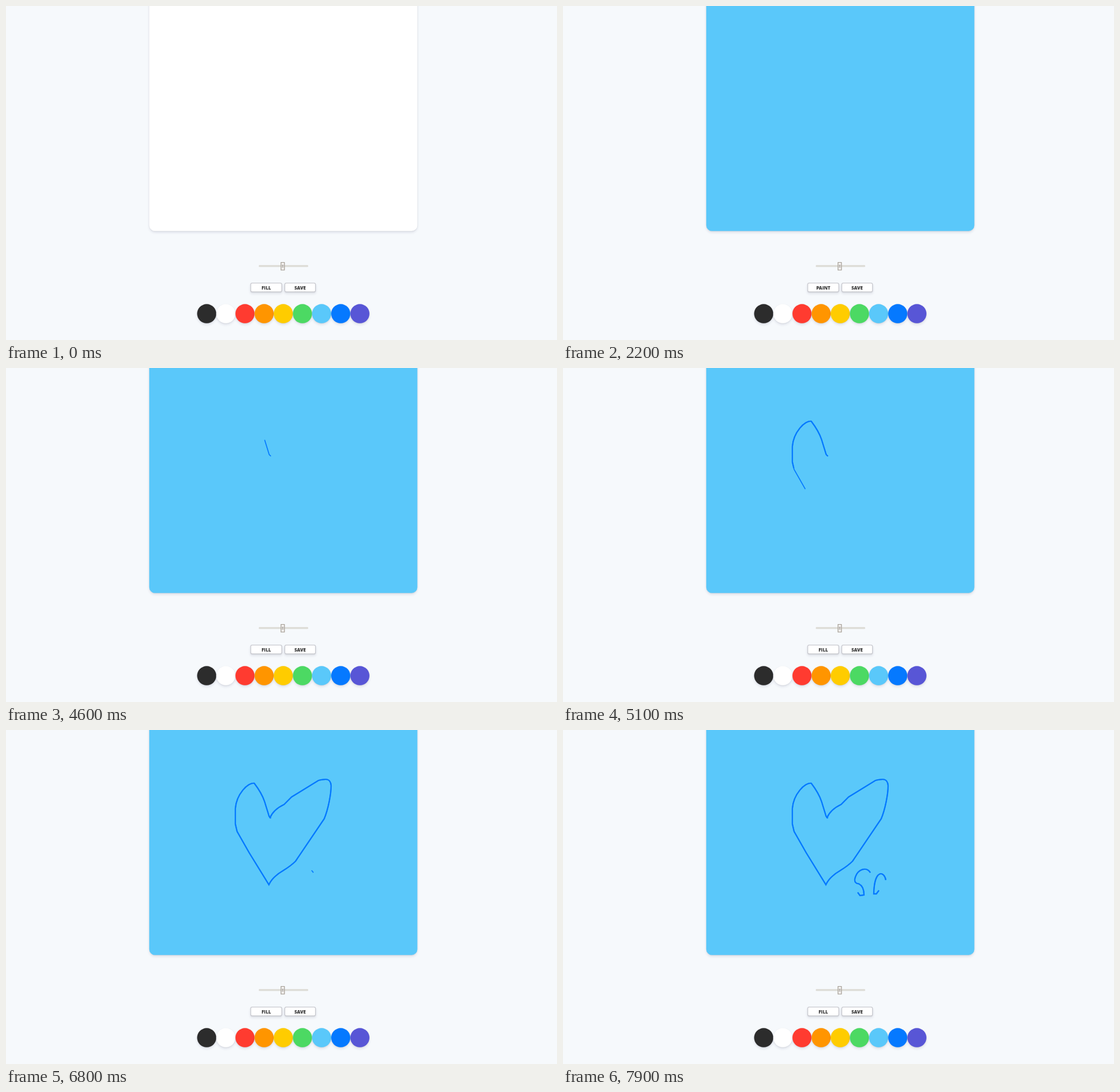
An HTML page that plays this animation: 961 px wide and 583 px high, repeating every 8 s.

```html
<!DOCTYPE html>
<html lang="en">
<head>
<meta charset="utf-8">
<title>Paint board</title>
<style>
  html, body { margin: 0; width: 100%; height: 100%; overflow: hidden; }
  body { background: #f6f9fc; }
  .stage {
    position: absolute; left: 0; top: 0; width: 1439px; height: 873px;
    transform: scale(.668); transform-origin: 0 0;
    --shadow: 0 4px 6px rgba(50, 50, 93, .11), 0 1px 3px rgba(0, 0, 0, .08);
  }
  .stage > * { position: absolute; box-sizing: border-box; }
  .board {
    left: 373.8px; top: -112.1px; width: 700px; height: 700px;
    border-radius: 15px; background: #fff; box-shadow: var(--shadow);
  }
  .track { left: 660px; top: 677.3px; width: 129px; height: 4.5px; border-radius: 2px; background: #dddcd6; }
  .thumb {
    left: 716.5px; top: 669px; width: 11px; height: 22px;
    border: 2px solid #aaa49c; border-radius: 1px;
    background: repeating-linear-gradient(#8d8882 0 1.5px, #f5f3f1 1.5px 3px) center / 5px 7.5px no-repeat #f5f3f1;
  }
  .button {
    top: 723.3px; width: 82.5px; height: 25px;
    border: 2px solid #cacbd1; border-radius: 5px; background: #fff;
    box-shadow: var(--shadow); color: rgba(0, 0, 0, .77);
    font: 800 12px/23px "Open Sans", sans-serif; text-align: center;
  }
  .button.pressed { transform: scale(.98); }
  #mode { left: 638.4px; }
  #save { left: 726.7px; }
  .colors { left: 498.6px; top: 778.6px; display: flex; }
  .colors i { width: 50px; height: 50px; border-radius: 25px; box-shadow: var(--shadow); }
  svg { position: absolute; left: 0; top: 0; fill: none; stroke: #0579ff; }
  .thin { stroke-width: 1.7; }
  .full { stroke-width: 2.3; }
</style>
</head>
<body>
<div class="stage">
  <div class="board" id="board"></div>
  <div class="track"></div>
  <div class="thumb"></div>
  <div class="button" id="mode">FILL</div>
  <div class="button" id="save">SAVE</div>
  <div class="colors" id="colors"></div>
</div>
<svg id="ink" width="961" height="583"></svg>
<script>
const LOOP = 8000, STEP = 100;
const palette = ['#2c2c2c', '#fff', '#ff3b30', '#ff9500', '#ffcc00', '#4cd963', '#5ac8fa', '#0579ff', '#5856d6'];

const heart = `M462 154 L459 151 L451 125 Q446 110 433 93 C422 91 402 112 400 137
  V164 L403 177 L424 214 L458.5 270 Q465 256 484 245 Q497 237 505 229 L555 155
  C562 138 567 112 567 97 C566 84 558 85 545 88 L498 117 L485 130 Q466 139 460 154`;
const letterS = 'M536 249 C530 238 513 242 509 260 Q508 268 516 268.5 Q525 273 525 288 L518 289 L514 283.5';
const letterC = 'M563 262 C561 247 543 241 542 286 H546.5 L551 280';

// power bends the pen's progress: 1 is an even pace, more is a slower start.
const strokes = [
  { path: heart, start: 4600, steps: 17, power: 1.06 },
  { path: letterS, start: 6800, steps: 6, power: 1.6 },
  { path: letterC, start: 7500, steps: 5, power: 1.6 }
];

const $ = id => document.getElementById(id);
const within = (t, from, to) => t >= from && t < to;
const clamp = x => Math.min(1, Math.max(0, x));

$('colors').innerHTML = palette.map(c => `<i style="background:${c}"></i>`).join('');
$('ink').innerHTML = strokes.map(s => ['thin', 'full'].map(
  name => `<path class="${name}" pathLength="1" d="${s.path}"/>`).join('')).join('');
strokes.forEach((s, i) => {
  [s.thin, s.full] = [...$('ink').children].slice(2 * i, 2 * i + 2);
});

function reveal(path, part) {
  path.style.visibility = part > 0 ? 'visible' : 'hidden';
  path.style.strokeDasharray = `${part} 2`;
}

// Fresh ink is thin; the full line follows and catches up at the end.
function drawStroke(s, t) {
  const done = clamp(((t - s.start) / STEP + 1) / s.steps) ** s.power;
  reveal(s.thin, done);
  reveal(s.full, clamp(done - .1 * (1 - done)));
}

function render(t) {
  $('mode').textContent = within(t, 1000, 3600) ? 'PAINT' : 'FILL';
  $('mode').classList.toggle('pressed', within(t, 900, 1000) || within(t, 3500, 3600));
  $('board').style.background = t >= 2200 ? palette[6] : '#fff';
  strokes.forEach(s => drawStroke(s, t));
}

const origin = performance.now();
let shown = -1;
function tick() {
  const step = Math.floor((performance.now() - origin) % LOOP / STEP);
  if (step !== shown) {
    shown = step;
    render(step * STEP);
  }
  requestAnimationFrame(tick);
}
tick();
</script>
</body>
</html>
```
